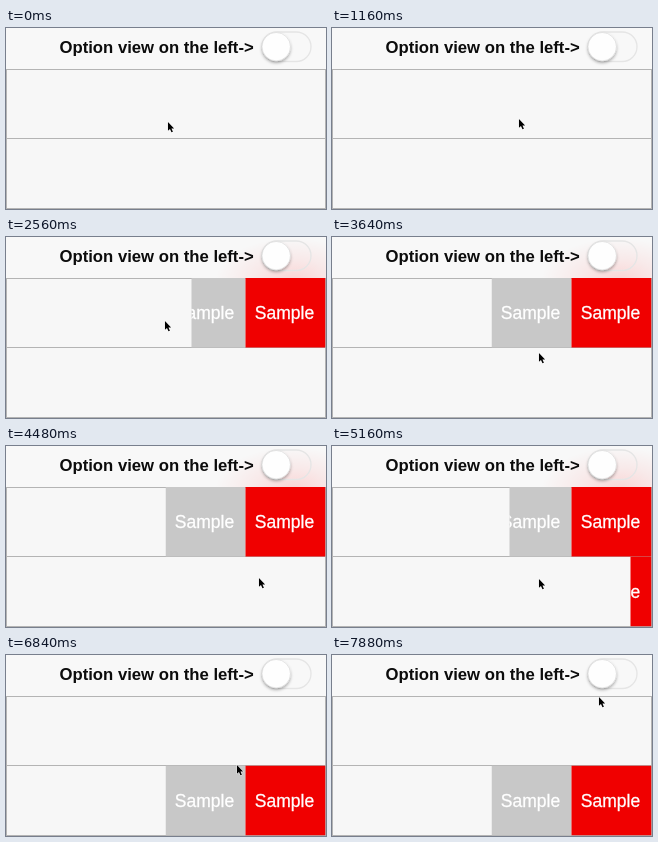
These frames come from a looping animation (320x181 px, 8000 ms). An HTML page:

```html
<!DOCTYPE html>
<html lang="en">
<head>
<meta charset="utf-8">
<title>Swipe options</title>
<style>
  html, body { margin: 0; width: 100%; height: 100%; overflow: hidden; background: #f7f7f7; }
  svg { display: block; width: 100%; height: 100%; }
  text { font-family: "Liberation Sans", Arial, sans-serif; }
  .title { font-size: 16.7px; font-weight: bold; fill: #0c0c0c; }
  .option { font-size: 17.5px; fill: #fff; stroke: #fff; stroke-width: .3; text-anchor: middle; }
</style>
</head>
<body>
<svg viewBox="0 0 320 181">
  <defs>
    <radialGradient id="glow">
      <stop offset="0" stop-color="#f00" stop-opacity=".14"/>
      <stop offset=".5" stop-color="#f00" stop-opacity=".06"/>
      <stop offset="1" stop-color="#f00" stop-opacity="0"/>
    </radialGradient>
    <filter id="shadow" x="-30%" y="-30%" width="160%" height="170%">
      <feDropShadow dx="0" dy="1.8" stdDeviation="1.8" flood-color="#000" flood-opacity=".32"/>
    </filter>
    <clipPath id="bar"><rect width="320" height="41"/></clipPath>
    <clipPath id="clip0"><rect id="open0" y="41" height="69.5"/></clipPath>
    <clipPath id="clip1"><rect id="open1" y="110.5" height="70"/></clipPath>
    <g id="options">
      <rect x="159.5" width="80" height="70" fill="#c8c8c8"/>
      <rect x="239.5" width="80" height="70" fill="#f00000"/>
      <text class="option" x="198.5" y="41">Sample</text>
      <text class="option" x="278.5" y="41">Sample</text>
    </g>
  </defs>

  <rect width="320" height="181" fill="#f7f7f7"/>
  <rect width="320" height="41" fill="#f8f8f8"/>
  <g clip-path="url(#bar)">
    <ellipse id="tint" cx="287" cy="43" rx="78" ry="42" fill="url(#glow)"/>
  </g>
  <text class="title" x="53.5" y="25.3">Option view on the left-&gt;</text>
  <rect x="256" y="4" width="49" height="29.5" rx="14.75" fill="none" stroke="#e5e5e5" stroke-width="1.3"/>
  <circle cx="270.2" cy="18.7" r="14.2" fill="#fefefe" stroke="#d0d0d0" stroke-width=".5" filter="url(#shadow)"/>

  <path d="M0 41.5H320M0 110.5H320M0 180.5H320M.5 41V181M319.5 41V181" fill="none" stroke="#b4b4b4"/>
  <g clip-path="url(#clip0)"><use href="#options" y="41"/></g>
  <g clip-path="url(#clip1)"><use href="#options" y="110.5"/></g>

  <g id="cursor">
    <path transform="translate(-.5) scale(.92)" d="M.5 0V9.6L2.7 7.6 4.3 11.2 5.9 10.5 4.3 7H7.2Z" fill="#000" stroke="#fff" stroke-width=".9" paint-order="stroke"/>
  </g>
</svg>
<script>
  const LOOP = 8000, STEP = 40, EDGE = 319.5, OPEN = 160;
  const byId = id => document.getElementById(id);

  const home = { x: 162, y: 94 };
  // bend > 1 makes the pointer cover its vertical distance early
  const moves = [
    { start: 970, end: 1480, x: 241, y: 84 },
    { start: 1600, end: 1800, x: 244, y: 84 },
    { start: 2040, end: 2600, x: 158, y: 84 },
    { start: 3420, end: 3960, x: 292, y: 131, bend: 2.6 },
    { start: 4120, end: 4680, x: 237, y: 133 },
    { start: 4960, end: 5460, x: 153, y: 134 },
    { start: 5480, end: 5680, x: 178, y: 135 },
    { start: 6480, end: 7280, x: 302, y: 77 },
    { start: 7320, end: 7880, x: 267, y: 42 }
  ];

  const progress = (t, start, end) => Math.min(1, Math.max(0, (t - start) / (end - start)));
  const smooth = p => p * p * (3 - 2 * p);
  // A finger drag that speeds up, then coasts to rest
  const swipe = (t, start, end) => 1 - (1 - progress(t, start, end) ** 1.8) ** 4.5;

  function pointerAt(t) {
    return moves.reduce((from, { start, end, x, y, bend = 1 }) => {
      const p = smooth(progress(t, start, end));
      const rise = 1 - (1 - p) ** bend;
      return { x: from.x + (x - from.x) * p, y: from.y + (y - from.y) * rise };
    }, home);
  }

  function draw(time) {
    const t = Math.floor(time % LOOP / STEP) * STEP;
    const shown = [
      swipe(t, 2040, 3000) - swipe(t, 5030, 6000),
      swipe(t, 5015, 6025)
    ];
    shown.forEach((part, i) => {
      const width = Math.round(part * OPEN);
      byId("open" + i).setAttribute("x", EDGE - width);
      byId("open" + i).setAttribute("width", width);
    });
    byId("tint").setAttribute("opacity", Math.min(1, shown[0] * 2));
    const { x, y } = pointerAt(t);
    byId("cursor").setAttribute("transform", `translate(${Math.round(x)} ${Math.round(y)})`);
  }

  const start = performance.now();
  function tick() {
    draw(performance.now() - start);
    requestAnimationFrame(tick);
  }
  tick();
</script>
</body>
</html>
```
